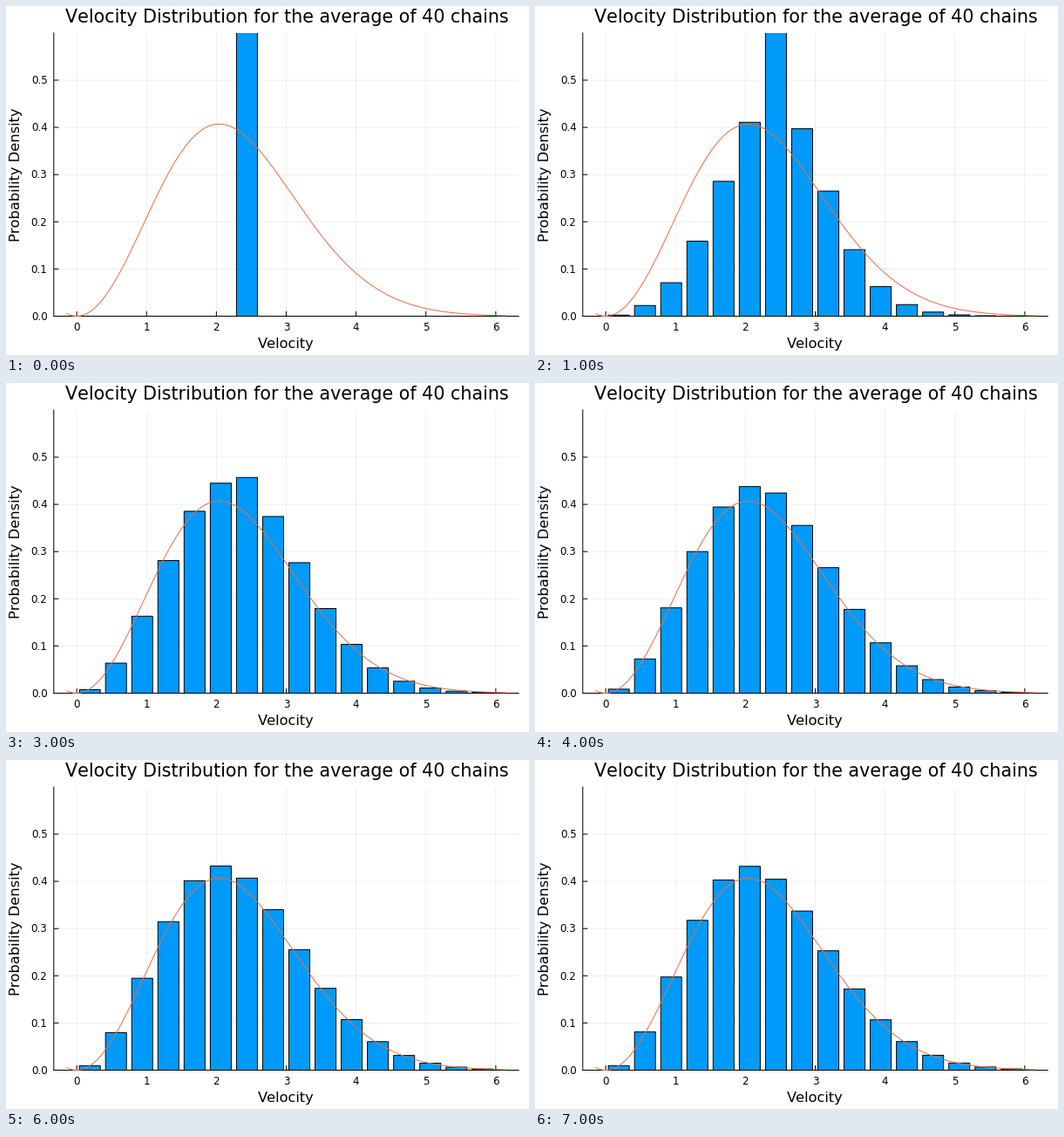
These frames come from a looping animation (600 by 400 pixels, 8 s). A matplotlib script:

```python
import math
import numpy as np
import matplotlib.pyplot as plt
from matplotlib.animation import FuncAnimation

W, H, DPI = 600, 400, 100
PT = 72 / DPI  # points per pixel
LEFT, RIGHT, TOP, BASE = 54.8, 588.2, 30.9, 355.5
X_MIN, X_MAX, Y_MAX = -0.3286, 6.3286, 0.6
X_UNIT = (RIGHT - LEFT) / (X_MAX - X_MIN)  # pixels per data unit
Y_UNIT = (BASE - TOP) / Y_MAX

STEPS = 8
BIN = 0.375
GAIN = 1.062   # bars are normalised slightly above unit area
SPREAD = 1.4425
V0 = 2.57      # speed every chain starts with
RATE = 1.7     # mean collisions per step
KEEP = 0.8     # share of velocity variance kept by a collision

plt.rcParams.update({"font.family": "DejaVu Sans", "path.snap": False,
                     "text.kerning_factor": 6})


def maxwell(v):
    return (np.sqrt(2 / np.pi) * v**2 / SPREAD**3
            * np.exp(-v**2 / (2 * SPREAD**2)))


def speed_density(v, k):
    """Density of the speed after k collisions."""
    if k == 0:
        return (np.abs(v - V0) < BIN / 2) / BIN
    mean = V0 * KEEP**(k / 2)
    s = SPREAD * math.sqrt(1 - KEEP**k)
    bell = (np.exp(-((v - mean) / s)**2 / 2)
            - np.exp(-((v + mean) / s)**2 / 2))
    return v * bell / (mean * s * math.sqrt(2 * math.pi))


def histogram(v, step):
    """Poisson mixture over the number of collisions so far."""
    hits = RATE * step
    return GAIN * sum(math.exp(-hits) * hits**k / math.factorial(k)
                      * speed_density(v, k) for k in range(40))


fig = plt.figure(figsize=(W / DPI, H / DPI), dpi=DPI, facecolor="white")
ax = fig.add_axes([LEFT / W, 1 - BASE / H,
                   (RIGHT - LEFT) / W, (BASE - TOP) / H])
ax.set_axisbelow(True)
ax.grid(color="black", alpha=0.1, linewidth=0.6 * PT)
ax.set_xticks(np.arange(7))
ax.set_yticks(np.arange(6) / 10)
ax.tick_params(length=0, labelbottom=False, labelleft=False)
for side, spine in ax.spines.items():
    spine.set_visible(side in ("left", "bottom"))
    spine.set_linewidth(PT)
    spine.set_zorder(0.9)


def label(x, y, text, size, ha="center", rotation=0):
    fig.text(x / W, 1 - y / H, text, fontsize=size * PT, ha=ha,
             va="baseline", rotation=rotation, rotation_mode="anchor")


label(322, 19, "Velocity Distribution for the average of 40 chains", 20.7)
label(321.6, 392, "Velocity", 16.27)
label(16.5, 193.5, "Probability Density", 16.27, rotation=90)

tick = dict(color="black", linewidth=PT, zorder=1)
for n in range(7):
    label(LEFT + (n - X_MIN) * X_UNIT, 371.7, str(n), 11.83)
    ax.plot([n, n], [0, 5 / Y_UNIT], **tick)
for n in range(6):
    level = n / 10
    label(47.6, BASE - level * Y_UNIT + 4.3, f"{level:.1f}", 11.83, ha="right")
    ax.plot([X_MIN, X_MIN + 5 / X_UNIT], [level, level], **tick)

centers = BIN * (np.arange(16) + 0.5)
bars = ax.bar(centers, histogram(centers, 0), width=0.8 * BIN,
              color="#009afa", edgecolor="black", linewidth=PT, zorder=2)
v = np.linspace(-0.14, 6.14, 400)
ax.plot(v, maxwell(v), color="#e26f46", linewidth=PT, zorder=3)
ax.set_xlim(X_MIN, X_MAX)
ax.set_ylim(0, Y_MAX)


def draw(step):
    for bar, height in zip(bars, histogram(centers, step)):
        bar.set_height(height)
    return list(bars)


anim = FuncAnimation(fig, draw, frames=STEPS, interval=1000,
                     repeat=True, repeat_delay=0)
plt.show()
```
